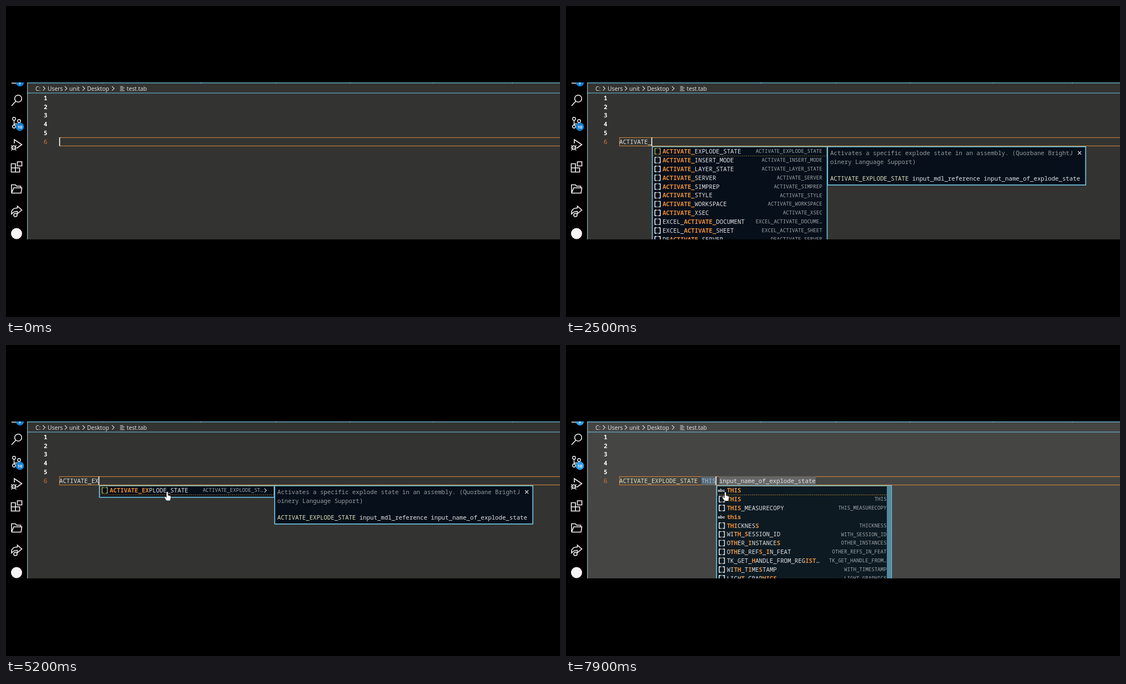
An HTML page that plays this animation: 998x561 px, repeating every 8 s.

```html
<!DOCTYPE html>
<html lang="en">
<head>
<meta charset="utf-8">
<title>Editor completion</title>
<style>
html, body { margin: 0; width: 100%; height: 100%; overflow: hidden; background: #000; }
svg { display: block; width: 998px; height: 561px; }
text { white-space: pre; font: 10.72px "Noto Sans Mono", "DejaVu Sans Mono", monospace; fill: #e4e4e4; }
.crumb { font: 10.3px "Open Sans", "Noto Sans", sans-serif; fill: #e8e8e8; }
.num { font-weight: 600; fill: #fff; text-anchor: end; }
.now { fill: #e8742c; font-weight: 500; }
.hit { fill: #ee8f36; font-weight: 700; }
.side { font-size: 9.11px; fill: #a2a8aa; text-anchor: end; }
.doc { fill: #989d9f; }
.fn { fill: #e4e2bc; }
.abc { font: 700 8px Roboto, sans-serif; }
.badge { font: 700 7.5px Roboto, sans-serif; fill: #fff; text-anchor: middle; }
.icon { fill: none; stroke: #f4f4f4; stroke-width: 1.6; }
.thin { fill: none; stroke: #ddd; stroke-width: 1.1; }
</style>
</head>
<body>
<svg viewBox="0 0 998 561">
  <clipPath id="view"><rect y="137.7" width="998" height="283.3"/></clipPath>
  <rect width="998" height="561"/>
  <g clip-path="url(#view)">
    <rect id="page" x="39" y="138" width="959" height="283"/>
    <g id="frame"></g>
    <g class="icon">
      <circle cx="22" cy="167" r="6.3"/>
      <path d="M17.5 172L10 180"/>
      <g stroke-width="1.4">
        <circle cx="14.5" cy="203.500" r="2.700"/><circle cx="23.500" cy="207.500" r="2.700"/><circle cx="14.5" cy="217.500" r="2.700"/>
        <path d="M14.5 206.200V215M23.500 210.200Q23 213 15 213"/>
      </g>
      <path d="M15 248V241L28.500 250L19.500 256.500"/>
      <circle cx="14" cy="255.500" r="3.300"/>
      <path stroke-width="1.200" d="M9 251.500L11.500 253M19 251.500L16.500 253M8.500 256H19.500M9.500 260.500L12 258M18.500 260.500L16 258"/>
      <path d="M9.500 284.500H17V299.500H9.500ZM9.500 292H24.500V299.500H17M20.500 281H28.500V288.500H20.500Z"/>
      <path d="M10 337.500V322.500H17L19 325H26.500V328M10 337.500H27L28.500 328H14L10 337.500"/>
      <path d="M10 371Q12 364 20.500 364.500V361L28.500 368L20.500 374.500V370.500Q14 370 10 375Z"/>
      <circle cx="17" cy="377" r="3"/>
    </g>
    <circle cx="19" cy="410.5" r="10" fill="#f4f4f4"/>
    <path d="M10 139.200H20" class="icon"/>
    <circle class="dot" cx="25" cy="138" r="7.200"/><text class="badge" x="25" y="141">2</text>
    <circle class="dot" cx="25" cy="217.800" r="7.400"/><text class="badge" x="25" y="220.500">10</text>
    <g id="mouse"></g>
  </g>
</svg>
<script>
const LOOP = 8000, CH = 6.432, X0 = 96, ROW = 15.85;
const TEAL = '#6fc3df', ORANGE = '#d88a35';
const $ = id => document.getElementById(id);

const COMMAND = 'ACTIVATE_EXPLODE_STATE';
const ARGS = ['input_mdl_reference', 'input_name_of_explode_state'];
const DOC = ['Activates a specific explode state in an assembly. (Quorbane BrightJ', 'oinery Language Support)'];

// time, number of characters typed
const TYPED = [[0, 0], [200, 1], [400, 2], [500, 3], [700, 4], [900, 5], [1100, 6],
  [1300, 7], [1600, 8], [2000, 9], [2700, 10], [3000, 11]];
const TYPED_ARG = [[7000, 1], [7200, 2], [7400, 3], [7600, 4]];
// time, x, y
const MOUSE = [[3900, 520, 405], [4700, 297, 269], [4900, 294, 266], [5200, 290.5, 264.5],
  [5700, 290.5, 264.5], [6300, 287, 265]];

const pair = name => [name, name];
const COMMANDS = [
  ...['EXPLODE_STATE', 'INSERT_MODE', 'LAYER_STATE', 'SERVER', 'SIMPREP', 'STYLE', 'WORKSPACE', 'XSEC']
    .map(s => pair('ACTIVATE_' + s)),
  ['Activate'],
  ['EXCEL_ACTIVATE_DOCUMENT', 'EXCEL_ACTIVATE_DOCUME…'],
  pair('EXCEL_ACTIVATE_SHEET'), pair('DEACTIVATE_SERVER')
];
// brackets mark the matched letters
const VALUES = [
  ['[THIS]'], ['[THIS]', 'THIS'], ['[THIS]_MEASURECOPY', 'THIS_MEASURECOPY'], ['[this]'],
  ['[THI]CKNES[S]', 'THICKNESS'], ['WI[TH]_[S]ESSION_ID', 'WITH_SESSION_ID'],
  ['O[TH]ER_[I]NSTANCE[S]', 'OTHER_INSTANCES'], ['O[TH]ER_REF[S]_[I]N_FEAT', 'OTHER_REFS_IN_FEAT'],
  ['TK_GET_[H]ANDLE_FROM_REG[IST]…', 'TK_GET_HANDLE_FROM…'],
  ['WI[TH]_T[I]ME[S]TAMP', 'WITH_TIMESTAMP'], ['LIGH[T]_GRAP[HICS]', 'LIGHT_GRAPHICS']
];

const text = (x, y, s, cls = '') => `<text x="${x}" y="${y}" class="${cls}">${s}</text>`;
const rect = (x, y, w, h, fill, more = '') =>
  `<rect x="${x}" y="${y}" width="${w}" height="${h}" fill="${fill}" ${more}/>`;
const path = (d, more = 'class="thin"') => `<path d="${d}" ${more}/>`;
const mark = s => s.replace(/\[(.*?)\]/g, '<tspan class="hit">$1</tspan>');
const at = (table, t) => table.filter(s => s[0] <= t).pop();
const border = `stroke="${TEAL}" stroke-width="1.7"`;

function mouseAt(t) {
  const a = at(MOUSE, t);
  if (!a) return null;
  const b = MOUSE[MOUSE.indexOf(a) + 1] || a;
  const k = a === b ? 0 : (t - a[0]) / (b[0] - a[0]);
  return [a[1] + (b[1] - a[1]) * k, a[2] + (b[2] - a[2]) * k];
}

function chrome() {
  let s = path('M38.6 138V421', 'stroke="#8fb5b8" stroke-width="1.2"');
  s += path('M39 138.600H998M39 157H998', `stroke="${TEAL}" stroke-width="1.2"`);
  for (const x of [174, 351, 486, 620, 770, 912]) s += rect(x - .5, 137.5, 1, 2, '#b8d8dc');
  [[53, 'C:'], [75, 'Users'], [114, 'unit'], [146, 'Desktop'], [217.5, 'test.tab']]
    .forEach(([x, w]) => s += text(x, 152.6, w, 'crumb'));
  for (const x of [66.5, 106, 138, 191]) s += path(`M${x} 145l3.800 3.800l-3.800 3.800`);
  s += path('M205.500 145.200h5.500M205.500 147.700h8M205.500 150.200h6M205.500 152.700h8');
  for (let n = 1; n <= 6; n++) s += text(74.5, 169.7 + 15.8 * (n - 1), n, n < 6 ? 'num' : 'num now');
  return s;
}

const currentLine = () => rect(96.4, 237.4, 905, 15, 'none', `stroke="${ORANGE}"`);
const caret = x => rect(x - .2, 237, 1.6, 15.5, '#fff');

function popup(left, items, { bar, hover, bg }) {
  const h = items.length > 9 ? 190 : items.length * ROW + 5;
  let s = rect(left + .8, 253.8, 315, h, bg, border);
  s += rect(left + 2, 254.5, 313, ROW, 'none', `stroke="${hover ? '#c98a35' : '#8a7434'}" stroke-dasharray="2 1.5" stroke-width=".9"`);
  items.forEach(([label, side], i) => {
    const y = 262.3 + i * ROW, x = left + 5;
    if (side) {
      const c = i || hover === 'value' ? '#eee' : '#a9a552';
      s += path(`M${x + .5} ${y - 5}h9.500v10h-9.500z`, `fill="none" stroke="${c}" stroke-width=".9" opacity=".75"`);
      s += path(`M${x + 3} ${y - 5}h-2.500v10h2.500M${x + 7.5} ${y - 5}h2.500v10h-2.500`, `fill="none" stroke="${c}" stroke-width="1.4"`);
      const cut = hover === 'command';
      s += text(left + (cut ? 296 : 307), y + 3, cut ? side.slice(0, -3) + '…' : side, 'side');
      if (cut) s += path(`M${left + 298} ${y - 3.500}l3.500 3.500l-3.500 3.500`);
    } else s += text(left + 3, y + 2.8, 'abc', 'abc');
    s += text(left + 19.2, y + 3.8, mark(label));
  });
  if (bar) s += rect(left + 307.5, 254.5, 8, bar, '#528b9d');
  return s;
}

function docs(left, bg) {
  const x = left + 321.2, cx = left + 770.5;
  return rect(left + 316.5, 253.8, 465, 69, bg, border)
    + text(x, 268.8, DOC[0], 'doc') + text(x, 284.6, DOC[1], 'doc')
    + text(x, 314.6, `<tspan class="fn">${COMMAND}</tspan> ${ARGS.join(' ')}`)
    + path(`M${cx - 3} 262l6 6m0 -6l-6 6`);
}

function typing(t) {
  const n = at(TYPED, t)[1], word = COMMAND.slice(0, n), x = X0 + n * CH, left = x + .8;
  let s = currentLine() + text(X0, 248.7, word);
  if (n) {
    const items = COMMANDS.filter(([l]) => l.toUpperCase().includes(word))
      .map(([l, d]) => [l.replace(new RegExp(word, 'i'), '[$&]'), d]);
    s += popup(left, items, { bar: n < 9 ? 148 : 0, hover: t >= 4700 && 'command', bg: '#060f1a' });
    s += docs(left, '#060f1a');
  }
  return s + caret(x);
}

function filled(t, late) {
  const step = at(TYPED_ARG, t), word = step ? 'THIS'.slice(0, step[1]) : ARGS[0];
  const x1 = X0 + 23 * CH, end = x1 + word.length * CH, x2 = end + CH;
  const soft = ['#4b4b4b', '#595959', '#666'][late];
  let s = step ? currentLine() : '';
  s += rect(x1, 237, end - x1, 15.8, step ? (late ? '#5c6870' : '#4b535a') : '#d0ca2e');
  s += rect(x2, 237, 27 * CH, 15.8, soft);
  s += text(X0, 248.7, COMMAND, 'fn') + text(x2, 248.7, ARGS[1]);
  s += `<text x="${x1}" y="248.7" style="fill:${step ? '#8fbfe6' : '#33331c'}">${word}</text>`;
  if (step) s += popup(end + .8, VALUES, { bar: 180, hover: 'value', bg: late ? '#0d1a22' : '#060f1a' });
  if (step || t < 6500 || t >= 6800) s += caret(end);
  return s;
}

function pointer(t) {
  const p = mouseAt(t);
  if (!p) return '';
  const hand = (t >= 4700 && t < 5700) || t >= 7000;
  const shape = hand
    ? path('M-1.600 1Q0 -1.200 1.600 1V6.500L5.500 7.500Q7 8 6.800 10.500L5.500 16.500H-1.500L-5.500 10.500Q-6 8.500 -4 8.800L-1.600 10.500Z',
      'fill="#fff" stroke="#111" stroke-width=".8"')
    : path('M-2.800 -6H-.8L0 -5.300L.8 -6H2.800M0 -5.300V5.300M-2.800 6H-.8L0 5.300L.8 6H2.800', 'class="thin"');
  return `<g transform="translate(${p})">${shape}</g>`;
}

const base = chrome();
let shown = -1;
function draw(now) {
  const t = Math.floor(now % LOOP / 100) * 100;
  if (t !== shown) {
    shown = t;
    const late = t >= 7900 ? 2 : t >= 7800 ? 1 : 0;
    $('page').setAttribute('fill', ['#333332', '#3c3c3b', '#454544'][late]);
    document.querySelectorAll('.dot').forEach(d => d.setAttribute('fill', late ? '#2f9fe6' : '#1580d0'));
    $('frame').innerHTML = base + (t < 5700 ? typing(t) : filled(t, late));
    $('mouse').innerHTML = pointer(t);
  }
}
const start = performance.now();
function tick() {
  draw(performance.now() - start);
  requestAnimationFrame(tick);
}
tick();
</script>
</body>
</html>
```
